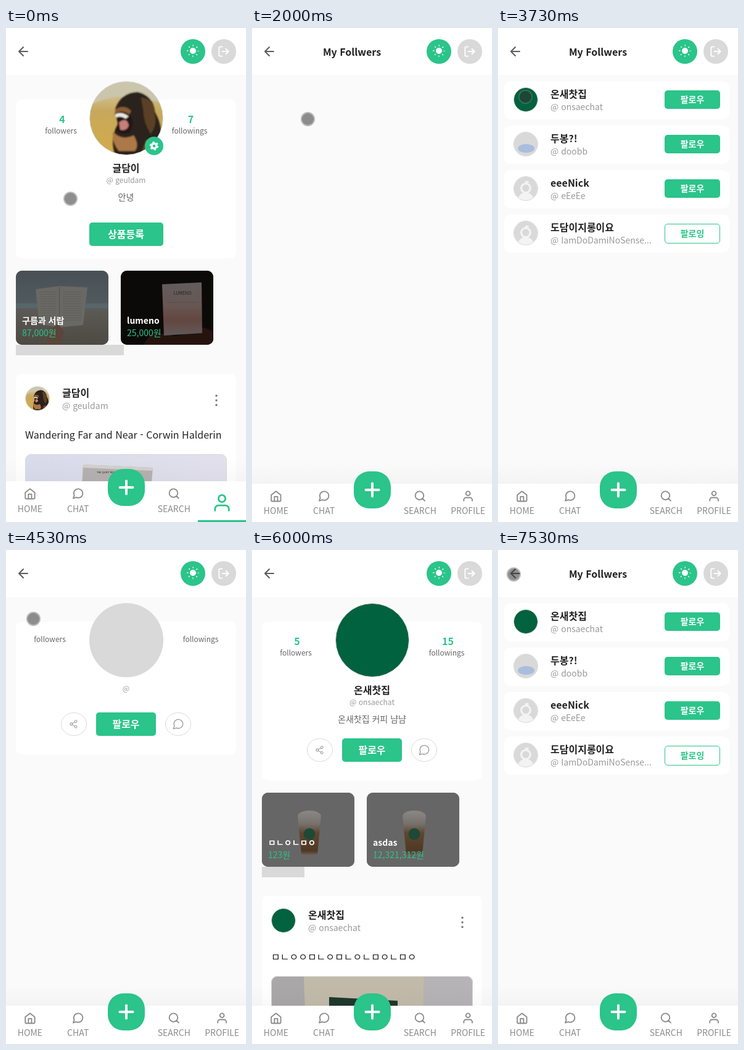
An HTML page that plays this animation: 389 by 800 pixels, repeating every 8 s.

```html
<!DOCTYPE html>
<html lang="ko">
<head>
<meta charset="utf-8">
<style>
html, body { margin: 0; width: 100%; height: 100%; overflow: hidden; background: #fafafa; }
svg { display: block; width: 389px; height: 800px; }
text { font: 16px 'Noto Sans CJK KR', 'Noto Sans CJK JP', 'Noto Sans CJK', sans-serif; fill: #222; white-space: pre; }
.s12 { font-size: 12px; } .s14 { font-size: 14px; } .s7 { font-size: 7px; } .s4 { font-size: 4px; }
.b { font-weight: 700; } .heavy { font-weight: 900; } .m { text-anchor: middle; }
.g { fill: #2bc48a; } .w { fill: #fff; } .gray { fill: #999; } .soft { fill: #666; } .tab { fill: #8b8b8b; }
.line { fill: none; stroke-linecap: round; stroke-linejoin: round; }
</style>
</head>
<body>
<svg id="stage" viewBox="0 0 389 800"></svg>
<script>
const GREEN = '#2bc48a', BRAND = '#00623f', EDGE = '#dbdbdb', LOOP = 8000;

const text = (x, y, s, cls = '') => `<text x="${x}" y="${y}" class="${cls}">${s}</text>`;
const rect = (x, y, w, h, fill, r = 0, extra = '') =>
  `<rect x="${x}" y="${y}" width="${w}" height="${h}" rx="${r}" fill="${fill}" ${extra}/>`;
const circle = (x, y, r, fill, extra = '') => `<circle cx="${x}" cy="${y}" r="${r}" fill="${fill}" ${extra}/>`;
const ellipse = (x, y, rx, ry, fill, extra = '') =>
  `<ellipse cx="${x}" cy="${y}" rx="${rx}" ry="${ry}" fill="${fill}" ${extra}/>`;
const path = (d, fill) => `<path d="${d}" fill="${fill}"/>`;
const group = (id, body) => `<g id="${id}">${body}</g>`;
const gradient = (id, dir, ...stops) => `<linearGradient id="${id}" ${dir}>` +
  stops.map(([at, color]) => `<stop offset="${at}" stop-color="${color}"/>`).join('') + '</linearGradient>';
const DOWN = 'x2="0" y2="1"';
const icon = (x, y, d, scale = .85, color = '#8b8b8b', width = 2.2) =>
  `<path class="line" transform="translate(${x} ${y}) scale(${scale}) translate(-12 -12)" d="${d}" stroke="${color}" stroke-width="${width}"/>`;

const icons = {
  home: 'M3 10l9-7 9 7v10a2 2 0 0 1-2 2H5a2 2 0 0 1-2-2zM9 22v-9h6v9',
  chat: 'M21 11.5a8.4 8.4 0 0 1-.9 3.8 8.5 8.5 0 0 1-7.6 4.7 8.4 8.4 0 0 1-3.8-.9L3 21l1.9-5.7a8.4 8.4 0 0 1-.9-3.8 8.5 8.5 0 0 1 4.7-7.6 8.4 8.4 0 0 1 3.8-.9h.5a8.5 8.5 0 0 1 8 8z',
  search: 'M19 11a8 8 0 1 1-16 0 8 8 0 0 1 16 0zM21 21l-4.3-4.3',
  user: 'M20 21v-2a4 4 0 0 0-4-4H8a4 4 0 0 0-4 4v2M16 7a4 4 0 1 1-8 0 4 4 0 0 1 8 0z',
  exit: 'M9 21H5a2 2 0 0 1-2-2V5a2 2 0 0 1 2-2h4M16 17l5-5-5-5M21 12H9',
  share: 'M21 5a3 3 0 1 1-6 0 3 3 0 0 1 6 0zM9 12a3 3 0 1 1-6 0 3 3 0 0 1 6 0zM21 19a3 3 0 1 1-6 0 3 3 0 0 1 6 0zM8.6 13.5l6.8 4M15.4 6.5l-6.8 4',
  back: 'M19 12H5M12 19l-7-7 7-7'
};

const defs = `<defs>
  <clipPath id="round"><circle r="60"/></clipPath>
  <clipPath id="card"><rect width="150" height="120" rx="10"/></clipPath>
  <clipPath id="photo"><rect x="31" y="690" width="327" height="120" rx="10"/></clipPath>
  <filter id="blur"><feGaussianBlur stdDeviation="1.2"/></filter>
  <linearGradient id="shade" ${DOWN}><stop stop-opacity="0"/><stop offset="1" stop-opacity=".025"/></linearGradient>` +
  gradient('field', DOWN, [0, '#d9d2bd'], [.4, '#c7a85c'], [1, '#d3ab48']) +
  gradient('beach', DOWN, [0, '#485056'], [.42, '#505a5e'], [.5, '#5d5b56'], [1, '#4d4943']) +
  gradient('cover', DOWN, [0, '#625d5c'], [.45, '#675653'], [.7, '#644640'], [1, '#605a5a']) +
  gradient('lilac', '', [0, '#d8dbea'], [1, '#e2e0ec']) +
  gradient('latte', DOWN, [0, '#8a8885'], [.3, '#77716c'], [.5, '#5f4630'], [.9, '#4f3824'], [1, '#6c655f']) + '</defs>';

// Avatars, drawn around 0,0 with radius 60
const dog = `<g clip-path="url(#round)">` + rect(-60, -60, 120, 120, 'url(#field)') +
  '<g filter="url(#blur)">' + path('M-60-22Q-20-40 10-35L60-26V-60H-60z', '#cbc6ab') +
  path('M-18 62Q-28 34-14 10L-18-16Q-8-42 18-43Q44-38 47-10Q62 14 58 62z', '#2b211b') +
  path('M24-34Q46-32 46-8Q52 10 40 26Q28 6 28-12z', '#5b3f26') +
  path('M-22 22Q-8 38 12 28Q22 44 14 54H-12Q-24 40-22 22z', '#ad7846') +
  path('M-18-14Q-4-24 8-12L4-4Q-8-10-19-6z', '#8a5c35') +
  path('M-20-6Q-6-16 7-4Q14 8 5 24Q-10 28-18 19Q-9 8-20-6z', '#231815') +
  path('M-12 7Q1-3 4 12Q1 22-10 19z', '#c77f7a') +
  path('M-19-6Q-8-12 4-3L-1 1Q-9-5-17-1z', '#eee8df') +
  path('M32 36Q52 28 56 60H24z', '#6d4526') + '</g></g>';
const plain = circle(0, 0, 60, BRAND);
const blueBlob = circle(0, 0, 60, '#d9d9d9') + ellipse(2, 22, 42, 22, '#a9bddd');
const nobody = `<g clip-path="url(#round)">` + circle(0, 0, 60, '#d9d9d9') + ellipse(0, 54, 38, 34, '#f3f3f3') +
  circle(0, -2, 23, '#d9d9d9', 'stroke="#f3f3f3" stroke-width="10"') + ellipse(6, -33, 10, 5, '#f3f3f3') + '</g>';
const avatar = (x, y, r, art) => `<g transform="translate(${x} ${y}) scale(${(r - .8) / 60})">${art}</g>` +
  circle(x, y, r - .5, 'none', `stroke="${EDGE}"`);

// Product art, 150 by 120, already darkened
const openBook = rect(0, 0, 150, 120, 'url(#beach)') + path('M0 53H150V61H0z', '#566669') +
  path('M32 30L70 25 116 27 109 88 70 92 38 86z', '#6a6864') + rect(70, 26, 1, 65, '#53514d') +
  [...Array(13)].map((_, i) => rect(40, 34 + i * 3.8, 25, 1, '#5f5d59') + rect(76, 34 + i * 3.8, 30, 1, '#5f5d59')).join('') +
  path('M48 120L56 96 68 86 78 98 72 120z', '#5b453b');
const paperback = rect(0, 0, 150, 120, '#0c0a09') +
  path('M36 120L52 99 90 106 134 92 150 98V120z', '#25140e') +
  path('M67 22L131 19 132 101 70 105z', 'url(#cover)') + text(100, 39, 'LUMENO', 'm s7') +
  rect(76, 51, 48, 1, '#584e4d');
const drink = rect(0, 0, 150, 120, '#666') +
  path('M58 37Q62 29 77 29Q92 29 96 37L90 100Q77 103 64 100z', 'url(#latte)') + circle(77, 67, 9.5, '#1e4937');

const card = (x, art, name, price) =>
  rect(x, 393, 150, 120, '#666', 10) +
  `<g class="pic" transform="translate(${x} 393)" clip-path="url(#card)">${art}</g>` +
  text(x + 10, 479, name, 's14 b w') + text(x + 10, 499, price, 's14 g');

const post = (name, handle, body, art, photo) =>
  rect(16, 560, 357, 260, '#fff', 10) + avatar(51, 600, 20, art) +
  text(91, 597, name, 'b') + text(91, 617, handle, 's14 gray') +
  [595.5, 603, 610.5].map(y => circle(341, y, 1.7, '#777')).join('') +
  text(31, 665, body) + `<g class="pic" clip-path="url(#photo)">${photo}</g>` +
  rect(31.5, 690.5, 326, 130, 'none', 10, `stroke="${EDGE}"`);

const stats = (inset, y, followers = '', followings = '') =>
  text(inset + 2, 154, followers, 'b g m') + text(inset, y, 'followers', 's12 soft m') +
  text(388.5 - inset, 154, followings, 'b g m') + text(386.5 - inset, y, 'followings', 's12 soft m');

const panel = h => rect(16, 116, 357, h, '#fff', 10);
const identity = (name, handle, bio) =>
  text(194.5, 233, name, 'b m') + text(194.5, 251, handle, 's12 gray m') + text(194.5, 279, bio, 's14 soft m');
const button = (x, y, w, label) => rect(x, y, w, 38, GREEN, 5) + text(194.5, y + 25, label, 'heavy w m');
const actions = y =>
  [110, 279].map(x => ellipse(x, y, 20.5, 18.5, '#fff', `stroke="${EDGE}"`)).join('') +
  icon(109.5, y, icons.share, .62, '#999', 1.7) + icon(279, y, icons.chat, .85, '#999', 1.6) +
  button(146, y - 19, 97, '팔로우');

const gear = circle(240, 191, 15, GREEN) + circle(240, 191, 4, 'none', 'stroke="#fff" stroke-width="3.4"') +
  circle(240, 191, 6, 'none', 'stroke="#fff" stroke-width="2.4" stroke-dasharray="3 3.283"');

const myProfile = panel(257) + stats(89, 171, 4, 7) + avatar(195, 146, 60, dog) + gear +
  identity('글담이', '@ geuldam', '안녕') + button(135, 315, 120, '상품등록') +
  card(16, openBook, '구름과 서랍', '87,000원') + card(186, paperback, 'lumeno', '25,000원') +
  rect(16, 513, 175, 17, '#d9d9d9', 1) +
  post('글담이', '@ geuldam', 'Wandering Far and Near - Corwin Halderin', dog,
    rect(31, 690, 327, 110, 'url(#lilac)') + path('M125 707L238 712 234 760H122z', '#b5b1b0') +
    path('M125 707L238 712 237 717 125 712z', '#d3d0cd') + text(147, 721, 'THE QUIET READING NOTE', 's4'));

const skeleton = panel(215) + stats(71, 149) + circle(195, 146, 60, '#d9d9d9') +
  text(194.5, 229, '@', 's12 gray m') + actions(282);

const shop = panel(257) + stats(71, 171, 5, 15) + circle(195, 146, 59.5, '#d9d9d9') +
  `<g class="pic">${avatar(195, 146, 60, plain)}</g>` +
  identity('온새찻집', '@ onsaechat', '온새찻집 커피 냠냠') + actions(324) +
  card(16, drink, 'ㅁㄴㅇㄴㅁㅇ', '123원') + card(186, drink, 'asdas', '12,321,312원') +
  rect(16, 513, 69, 17, '#d9d9d9', 1) +
  post('온새찻집', '@ onsaechat', 'ㅁㄴㅇㅇㅁㄴㅇㅁㄴㅇㄴㅁㅇㄴㅁㅇ', plain,
    rect(31, 690, 327, 110, '#a9a7a8') + path('M84 690H279L276 800H88z', '#c2baa9') +
    path('M279 690H358V800H276z', '#b5b3b5') + path('M125 724L236 730V800H125z', '#20382d'));

const people = [
  ['온새찻집', '@ onsaechat', plain], ['두봉?!', '@ doobb', blueBlob],
  ['eeeNick', '@ eEeEe', nobody], ['도담이지롱이요', '@ IamDoDamiNoSense...', nobody]
];
const rows = people.map(([name, handle, art], i) => {
  const y = 86 + 72 * i, following = i === 3;
  return rect(10, y, 365, 62, '#fff', 10) + avatar(45, y + 30, 20, art) +
    text(85, y + 27, name, 'b') + text(85, y + 47, handle, 's14 gray') +
    (following ? rect(270.5, y + 15.5, 89, 31, '#fff', 4.5, `stroke="${GREEN}"`) : rect(270, y + 15, 90, 30, GREEN, 5)) +
    text(315, y + (following ? 36 : 35), following ? '팔로잉' : '팔로우', 's14 b m ' + (following ? 'g' : 'w'));
}).join('');

const header = rect(0, 0, 389, 76, '#fff') + icon(28, 38, icons.back, 1, '#5c5c5c', 2) +
  circle(303, 38, 20, GREEN) + circle(303, 37, 5, '#fff') +
  circle(303, 37, 8.6, 'none', 'stroke="#fff" stroke-width="2.4" stroke-dasharray="1.3 5.454" stroke-dashoffset=".65"') +
  circle(353, 38, 20, '#d9d9d9') + icon(353, 38, icons.exit, .85, '#fff');

const nav = (lift, active) => {
  const tabs = [[38.9, 'home', 'HOME'], [116.7, 'chat', 'CHAT'], [272.3, 'search', 'SEARCH']];
  if (!active) tabs.push([350.1, 'user', 'PROFILE']);
  const y = 748 - lift;
  return rect(0, 704 - lift, 389, 34, 'url(#shade)') + rect(0, 738 - lift, 389, 70, '#fff') +
    tabs.map(([x, name, label]) => icon(x, 758 - lift, icons[name]) +
      text(x, 787 - lift * .75, label, 's14 m tab')).join('') +
    rect(165, y - 30, 60, 60, GREEN, 25) +
    `<path class="line" d="M184.5 ${y}H205.5M195 ${y - 10.5}V${y + 10.5}" stroke="#fff" stroke-width="4"/>` +
    (active ? icon(350, 769, icons.user, 1.4, GREEN, 2) + rect(311, 797, 78, 3, GREEN) : '');
};

const stage = document.getElementById('stage');
stage.innerHTML = defs + rect(0, 0, 389, 800, '#fafafa') + header +
  group('mine', myProfile + nav(4, true)) +
  group('title', text(162, 45, 'My Follwers', 'b m')) + group('rows', rows) +
  group('skeleton', skeleton) + group('shop', shop) + group('nav', nav(0, false)) +
  rect(0, 0, 0, 0, '#3ba4dc', 3, 'id="tap"') +
  group('dot', circle(0, 0, 9.7, 'rgba(50,50,50,.55)') +
    circle(0, 0, 10.6, 'none', 'stroke="rgba(120,120,120,.5)" stroke-width="1.8"'));

const byId = id => document.getElementById(id);
const show = (id, on) => byId(id).style.display = on ? '' : 'none';
const within = (t, a, b) => t >= a && t < b;
const shopPics = byId('shop').querySelectorAll('.pic');

// Pointer strokes: start, end, from x, y, to x, y, move start, move end
const strokes = [
  [0, 470, 104.5, 276.5], [1530, 3130, 90.5, 147.5],
  [3130, 3530, 90.5, 144.5, 57.5, 114.5, 3210, 3470],
  [3730, 6000, 44.5, 111.5], [6670, LOOP, 25.5, 40.5, 25.5, 39.5, 6670, 6800]
];
// Tap highlights: start, end, x, y, width, height
const taps = [[1730, 2000, 61, 134, 56, 42], [4200, 4530, 20, 91, 228, 50], [7130, 7400, 15, 26, 25, 24]];

function render(t) {
  show('mine', t < 2000);
  show('nav', t >= 2000);
  show('title', within(t, 2000, 4530) || t >= 7400);
  show('rows', within(t, 2130, 4530) || t >= 7530);
  show('skeleton', within(t, 4530, 4670));
  show('shop', within(t, 4670, 7400));
  shopPics.forEach(p => p.style.display = t >= 4730 ? '' : 'none');

  const stroke = strokes.find(([a, b]) => within(t, a, b));
  show('dot', stroke);
  if (stroke) {
    const [, , x, y, x2 = x, y2 = y, a = 0, b = 1] = stroke;
    const k = Math.min(1, Math.max(0, (t - a) / (b - a)));
    byId('dot').setAttribute('transform', `translate(${x + (x2 - x) * k} ${y + (y2 - y) * k})`);
  }

  const tap = taps.find(([a, b]) => within(t, a, b));
  show('tap', tap);
  if (tap) {
    const [a, , x, y, width, height] = tap;
    const opacity = .5 * Math.min(1, .25 + (t - a) / 260);
    Object.entries({ x, y, width, height, opacity }).forEach(([k, v]) => byId('tap').setAttribute(k, v));
  }
}

function tick() {
  render(performance.now() % LOOP);
  requestAnimationFrame(tick);
}
tick();
</script>
</body>
</html>
```
